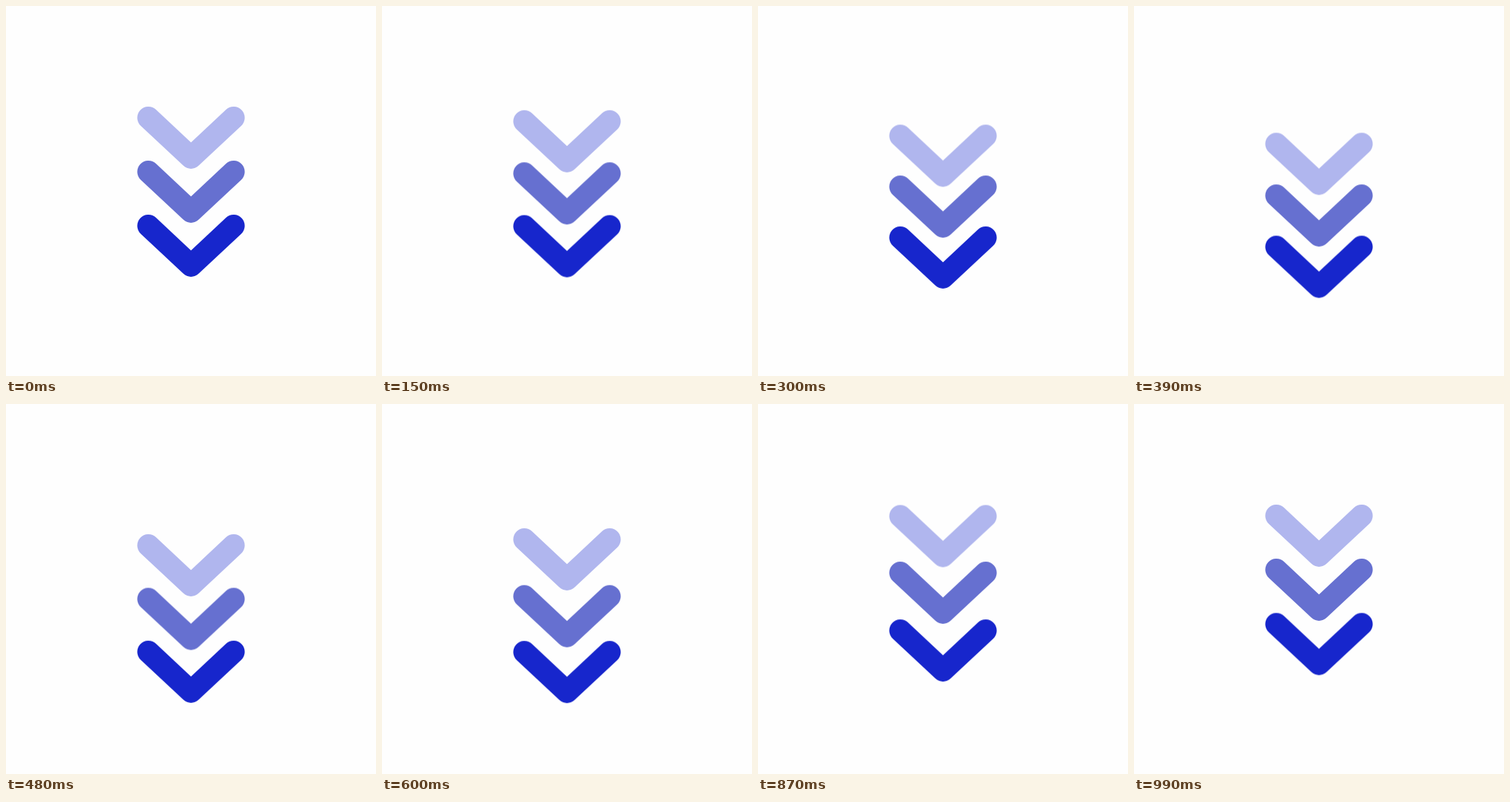
An HTML page that plays this animation: 500 by 500 pixels, repeating every 1.02 s.

```html
<!DOCTYPE html>
<html lang="en">
<head>
<meta charset="utf-8">
<title>Scroll down arrows</title>
<style>
  html, body {
    margin: 0;
    width: 100%;
    height: 100%;
    overflow: hidden;
    background: #fefefe;
  }
  svg {
    display: block;
    width: 100%;
    height: 100%;
  }
  .arrow {
    fill: none;
    stroke-width: 30;
    stroke-linecap: round;
    stroke-linejoin: round;
    animation: 1020ms cubic-bezier(.3333, 0, .6667, 1) infinite;
  }
  .top    { stroke: #b0b6ee; animation-name: dip-top; }
  .middle { stroke: #6670d0; animation-name: dip-middle; }
  .bottom { stroke: #1726cc; animation-name: dip-bottom; }

  /* Each arrow starts a little later and returns a little slower. */
  @keyframes dip-top {
    0%, 5.882%    { transform: translateY(0); }
    47.059%       { transform: translateY(40px); }
    88.235%, 100% { transform: translateY(0); }
  }
  @keyframes dip-middle {
    0%, 8.824%    { transform: translateY(0); }
    50%           { transform: translateY(40px); }
    94.118%, 100% { transform: translateY(0); }
  }
  @keyframes dip-bottom {
    0%, 11.765%   { transform: translateY(0); }
    52.941%       { transform: translateY(40px); }
    100%          { transform: translateY(0); }
  }
</style>
</head>
<body>
<svg viewBox="0 0 500 500">
  <path class="arrow top" d="M192.4 151 L250 204.9 L307.6 151"/>
  <path class="arrow middle" d="M192.4 224 L250 277.9 L307.6 224"/>
  <path class="arrow bottom" d="M192.4 297 L250 350.9 L307.6 297"/>
</svg>
</body>
</html>
```
